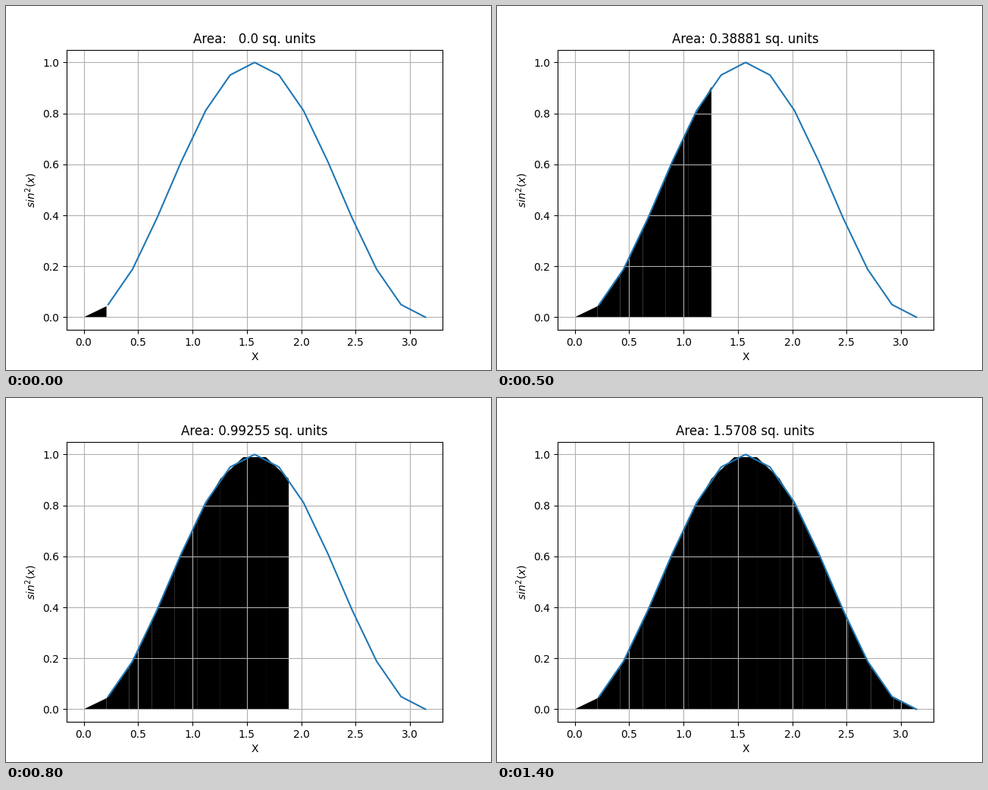
Recreate the animation shown at these times as a matplotlib script. Size 640 px wide and 480 px high, loop 1500 ms.

```python
import numpy as np
import matplotlib.pyplot as plt
from matplotlib.animation import FuncAnimation

STEPS = 15
MARGIN = 0.05


def f(x):
    return np.sin(x) ** 2


edges = np.linspace(0, np.pi, STEPS + 1)
width = np.pi / STEPS
curve_x = np.linspace(0, np.pi, STEPS)[1:]

plt.rcParams["font.family"] = "DejaVu Sans"
fig, ax = plt.subplots(figsize=(6.4, 4.8), dpi=100)
ax.plot(curve_x, f(curve_x), color="#1f77b4", linewidth=1.5)
ax.grid(True)
ax.set_xlabel("X")
ax.set_ylabel("$sin^2(x)$")
title = ax.set_title("")

# Separate slices keep the faint seams between neighbours.
slices = [
    ax.fill_between(edges[i:i + 2], f(edges[i:i + 2]), facecolor="black")
    for i in range(STEPS)
]

ax.set_xlim(-MARGIN * np.pi, (1 + MARGIN) * np.pi)
ax.set_ylim(-MARGIN, 1 + MARGIN)


def update(step):
    for i, part in enumerate(slices):
        part.set_visible(i <= step)
    # Left Riemann sum up to the current slice
    area = float(width * f(edges[:step + 1]).sum())
    title.set_text(f"Area: {area:5.5} sq. units")
    return [*slices, title]


anim = FuncAnimation(fig, update, frames=STEPS, init_func=lambda: update(0),
                     interval=100, repeat=True, repeat_delay=0)
plt.show()
```
